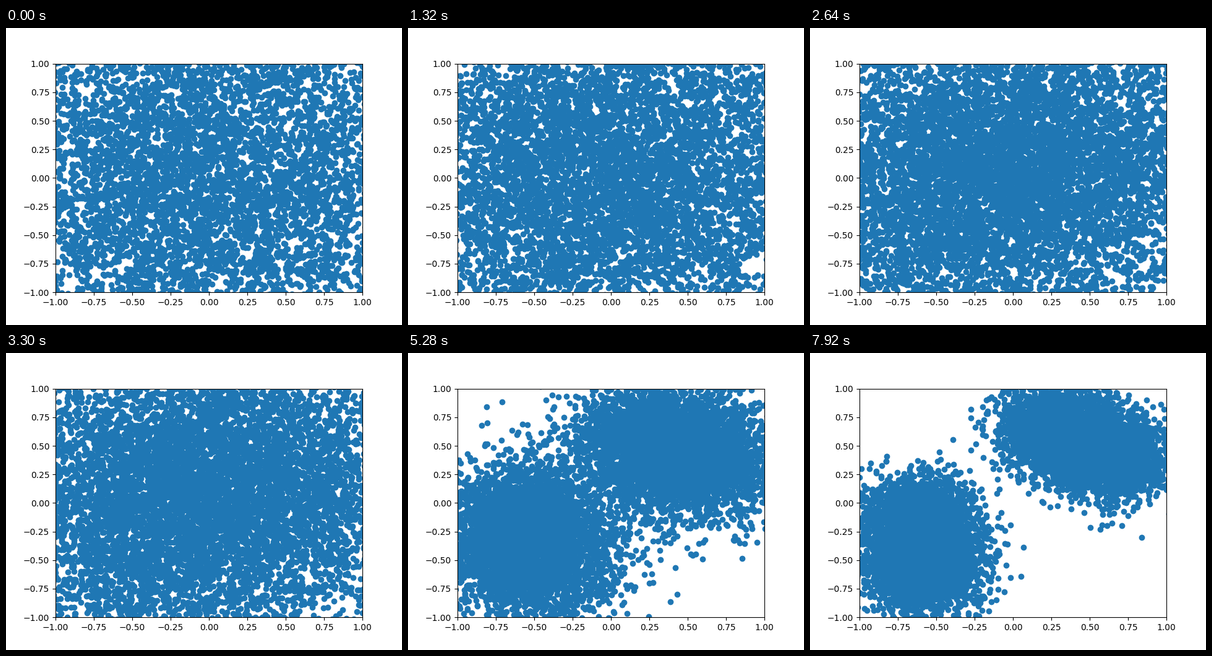
A matplotlib script that plays this animation: 640 px wide and 480 px high, repeating every 8000 ms.

```python
import numpy as np
import matplotlib.pyplot as plt
from matplotlib.animation import FuncAnimation

COUNT = 10000
INTERVAL = 40   # ms per drawn frame
HOLD = 330      # ms per diffusion step
LAST = 24
WIDTH = 0.18    # spread of the final clusters

rng = np.random.default_rng(7)


def band(start, end, n):
    """Points spread evenly along a segment."""
    u = rng.random((n, 1))
    return np.array(start) * (1 - u) + np.array(end) * u


target = np.vstack([
    band((-0.63, -0.02), (-0.57, -0.71), COUNT // 2),
    band((0.19, 0.73), (0.75, 0.33), COUNT // 2),
])
noise_a = rng.normal(size=(COUNT, 2))
noise_b = rng.normal(size=(COUNT, 2))
lag = 0.8 * rng.normal(size=(COUNT, 1))

KNOTS = np.arange(0, 25, 4)
PULL = [0, 0.18, 0.38, 0.65, 0.9, 0.99, 1]
NOISE = [1, 0.85, 0.70, 0.50, 0.20, 0.07, 0.02]


def positions(step):
    """Noise turns slowly while each point is pulled to its cluster."""
    t = np.clip(step - lag, 0, LAST)
    pull = np.interp(t, KNOTS, PULL)
    spread = np.hypot(np.interp(t, KNOTS, NOISE), WIDTH * pull)
    turn = 0.16 * step
    noise = np.cos(turn) * noise_a + np.sin(turn) * noise_b
    return pull * target + spread * noise


fig, ax = plt.subplots(figsize=(6.4, 4.8), dpi=100)
ax.set_xlim(-1, 1)
ax.set_ylim(-1, 1)
start = positions(0)
dots = ax.scatter(start[:, 0], start[:, 1], color="#1f77b4")


def update(frame):
    dots.set_offsets(positions(frame * INTERVAL // HOLD))
    return (dots,)


anim = FuncAnimation(fig, update, frames=200, interval=INTERVAL,
                     repeat=True, repeat_delay=0, blit=False)
plt.show()
```
